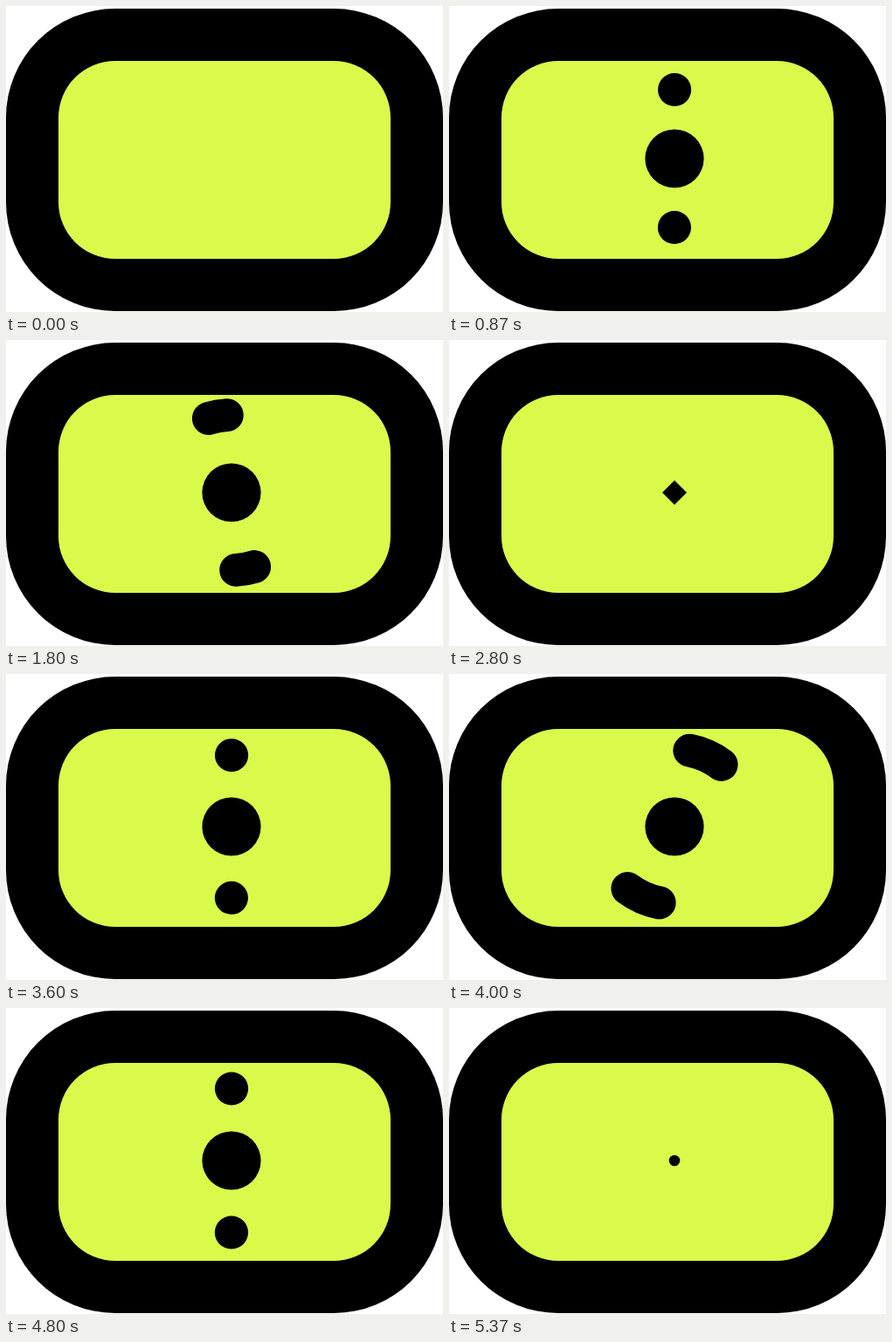
Write an HTML page with a canvas that moves like this. It is 500 by 351 pixels and loops after 5.41 s.

```html
<!DOCTYPE html>
<html lang="en">
<head>
<meta charset="utf-8">
<title>Orbit</title>
<style>
html, body { margin: 0; width: 100%; height: 100%; overflow: hidden; background: #fff; }
canvas { display: block; }
</style>
</head>
<body>
<canvas id="stage" width="500" height="351"></canvas>
<script>
const ctx = document.getElementById('stage').getContext('2d');
const LOOP = 5410, CYCLE = 2722, LEAD_IN = 20, FPS = 30;
const HALF = 33.6, ORBIT = 89, DOT = 19;

const sine = s => (1 - Math.cos(Math.PI * s)) / 2;
const cubic = s => s < .5 ? 4 * s ** 3 : 1 - 4 * (1 - s) ** 3;

// CSS "ease": cubic-bezier(.25, .1, .25, 1)
function ease(x) {
  const bez = (a, b, u) => 3 * a * u * (1 - u) ** 2 + 3 * b * u * u * (1 - u) + u ** 3;
  let lo = 0, hi = 1;
  for (let i = 0; i < 20; i++) {
    const mid = (lo + hi) / 2;
    if (bez(.25, .25, mid) < x) lo = mid; else hi = mid;
  }
  return bez(.1, 1, lo);
}

// Eased progress of p through the span from a to b
const during = (p, a, b, curve) => curve(Math.min(1, Math.max(0, (p - a) / (b - a))));

function box(x, y, w, h, r, color) {
  ctx.fillStyle = color;
  ctx.beginPath();
  ctx.roundRect(x, y, w, h, r);
  ctx.fill();
}

function drawCore(p) {
  const size = HALF * (during(p, 0, 290, ease) - during(p, 2380, 2722, sine));
  if (size < .4) return;
  const round = size * during(p, 580, 800, sine);
  ctx.save();
  ctx.rotate(Math.PI / 4);
  box(-size, -size, 2 * size, 2 * size, round, '#000');
  ctx.restore();
}

function drawSatellites(p) {
  const dist = ORBIT * (during(p, 586, 919, sine) - during(p, 2000, 2333, sine));
  if (dist < 1) return;
  const angle = (a, b) => Math.PI * (during(p, a, b, cubic) - .5);
  const head = angle(836, 1972), tail = angle(976, 2104);
  ctx.lineWidth = 2 * DOT;
  ctx.lineCap = 'round';
  ctx.strokeStyle = '#000';
  for (const turn of [0, Math.PI]) {
    ctx.beginPath();
    ctx.arc(0, 0, dist, tail + turn, head + turn + .002);
    ctx.stroke();
  }
}

function draw(now) {
  const frame = Math.min(161, Math.floor((now % LOOP + 4) * FPS / 1000));
  const p = (frame * 1000 / FPS - LEAD_IN + CYCLE) % CYCLE;
  ctx.clearRect(0, 0, 500, 351);
  box(0, 3, 500, 347, 125, '#000');
  box(60, 63, 380, 227, 65, '#d9f94b');
  ctx.save();
  ctx.translate(258, 175);
  drawSatellites(p);
  drawCore(p);
  ctx.restore();
}

const start = performance.now();
function tick() {
  draw(performance.now() - start);
  requestAnimationFrame(tick);
}
tick();
</script>
</body>
</html>
```
